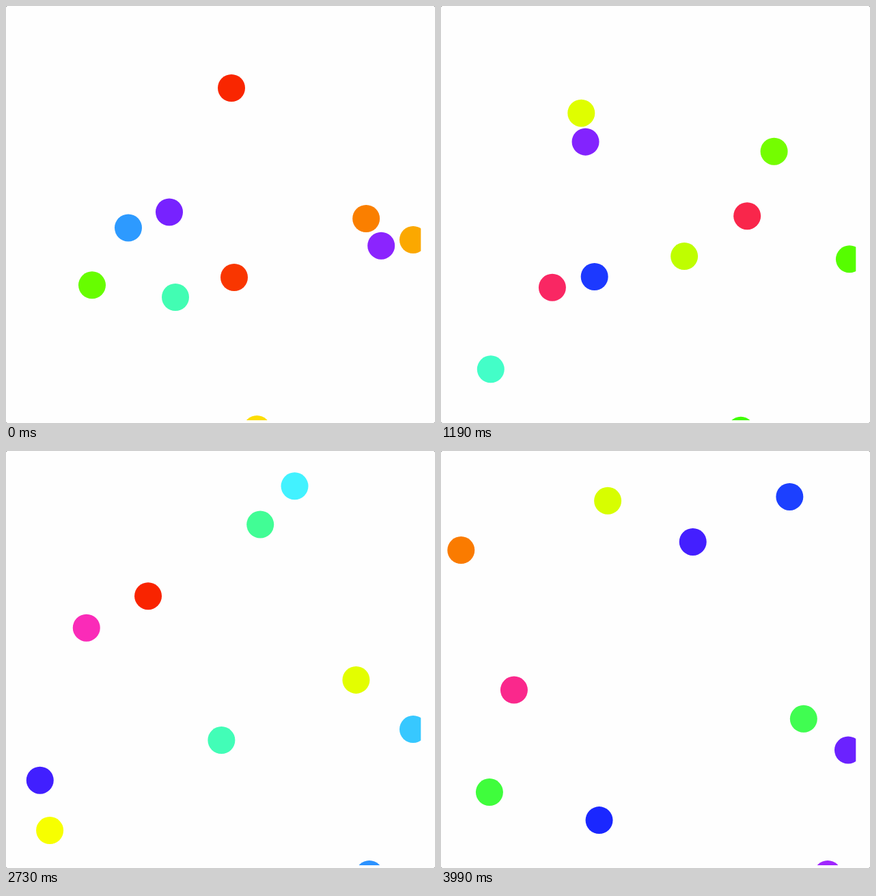
Write an HTML page with a canvas that moves like this. It is 628x610 px and loops after 4.06 s.

```html
<!DOCTYPE html>
<html lang="en">
<head>
<meta charset="utf-8">
<title>Bouncing balls</title>
<style>
  html, body { margin: 0; width: 100%; height: 100%; overflow: hidden; background: #fefefe; }
  canvas { display: block; width: 628px; height: 610px; }
</style>
</head>
<body>
<canvas id="stage" width="628" height="610"></canvas>
<script>
const ctx = document.getElementById('stage').getContext('2d');
const STEP = 70, COUNT = 58, TICKS_PER_STEP = 3.97;
const RADIUS = 20, SPEED = 2, TOUCH = 40.5;
const BOX = { x: 7.3, y: 6, size: 600 };

function makeBall(x, y, heading, hue) {
  const angle = heading * Math.PI / 180;
  return { x, y, vx: SPEED * Math.cos(angle), vy: SPEED * Math.sin(angle), hue };
}

// Start positions, headings in degrees and hues
const startBalls = () => [
  makeBall(330, 120, 163.6, 1),
  makeBall(179, 324.5, -75.5, 204),
  makeBall(248, 426, 52.1, 162),
  makeBall(239, 301.5, 124.6, 268),
  makeBall(549.2, 350.7, 23.3, 273),
  makeBall(126, 408.3, 113.4, 100),
  makeBall(596, 342, 12.2, 39),
  makeBall(367.3, 619, 57.7, 52),
  makeBall(527.2, 311, 68.05, 29),
  makeBall(334, 397, 125.6, 9)
];

const outside = (v, start) => v < start + RADIUS || v > start + BOX.size - RADIUS;
const distance = (a, b) => Math.hypot(b.x - a.x, b.y - a.y);

// Speed of a towards b
const approach = (a, b) =>
  (a.vx * (b.x - a.x) + a.vy * (b.y - a.y)) / distance(a, b);

function reverse(ball) {
  ball.vx = -ball.vx;
  ball.vy = -ball.vy;
}

// The striking ball turns back, and so does a ball struck from the side.
function collide(a, b) {
  const [striker, other] = approach(a, b) > approach(b, a) ? [a, b] : [b, a];
  if (approach(striker, other) < SPEED / 2) return;
  if (Math.abs(approach(other, striker)) < SPEED / 4) reverse(other);
  reverse(striker);
}

function eachPair(balls, visit) {
  balls.forEach((a, i) => balls.slice(i + 1).forEach(b => visit(a, b)));
}

function advance(balls) {
  const apart = [];
  eachPair(balls, (a, b) => {
    if (distance(a, b) >= TOUCH) apart.push([a, b]);
  });
  for (const ball of balls) {
    ball.x += ball.vx;
    ball.y += ball.vy;
    if (outside(ball.x, BOX.x)) ball.vx = -ball.vx;
    if (outside(ball.y, BOX.y)) ball.vy = -ball.vy;
    ball.hue++;
  }
  for (const [a, b] of apart) {
    if (distance(a, b) < TOUCH) collide(a, b);
  }
}

function ballsAt(ticks) {
  const balls = startBalls();
  for (let n = 0; n < ticks; n++) advance(balls);
  return balls;
}

const toLinear = v => v <= 0.04045 ? v / 12.92 : ((v + 0.055) / 1.055) ** 2.4;
const toGamma = v => v <= 0.0031308 ? v * 12.92 : 1.055 * v ** (1 / 2.4) - 0.055;
const clamp = v => Math.min(1, Math.max(0, v));

// Full-saturation hue, mixed through a display profile
function hueColor(hue) {
  const channel = shift => {
    const k = (hue + shift) % 360 / 60;
    return toLinear(clamp(Math.abs(k - 3) - 1));
  };
  const r = channel(0), g = channel(240), b = channel(120);
  const mixed = [
    0.95 * r + 0.05 * g + 0.01 * b,
    0.018 * r + 0.98 * g + 0.013 * b,
    b - 0.02 * r
  ];
  return `rgb(${mixed.map(v => Math.round(255 * toGamma(clamp(v)))).join(',')})`;
}

function draw(step) {
  ctx.fillStyle = '#888';
  ctx.fillRect(0, 0, 628, 610);
  ctx.fillStyle = '#fefefe';
  ctx.beginPath();
  ctx.roundRect(0, 0, 628, 610, 2.5);
  ctx.fill();

  ctx.save();
  ctx.beginPath();
  ctx.rect(BOX.x, BOX.y, BOX.size, BOX.size);
  ctx.clip();
  for (const { x, y, hue } of ballsAt(Math.floor(step * TICKS_PER_STEP))) {
    ctx.fillStyle = hueColor(hue);
    ctx.beginPath();
    ctx.arc(x, y, RADIUS, 0, Math.PI * 2);
    ctx.fill();
  }
  ctx.restore();
}

const start = performance.now();
let shown = -1;
function loop() {
  const elapsed = Math.max(0, performance.now() - start);
  const step = Math.floor(elapsed / STEP) % COUNT;
  if (step !== shown) draw(shown = step);
  requestAnimationFrame(loop);
}
loop();
</script>
</body>
</html>
```
